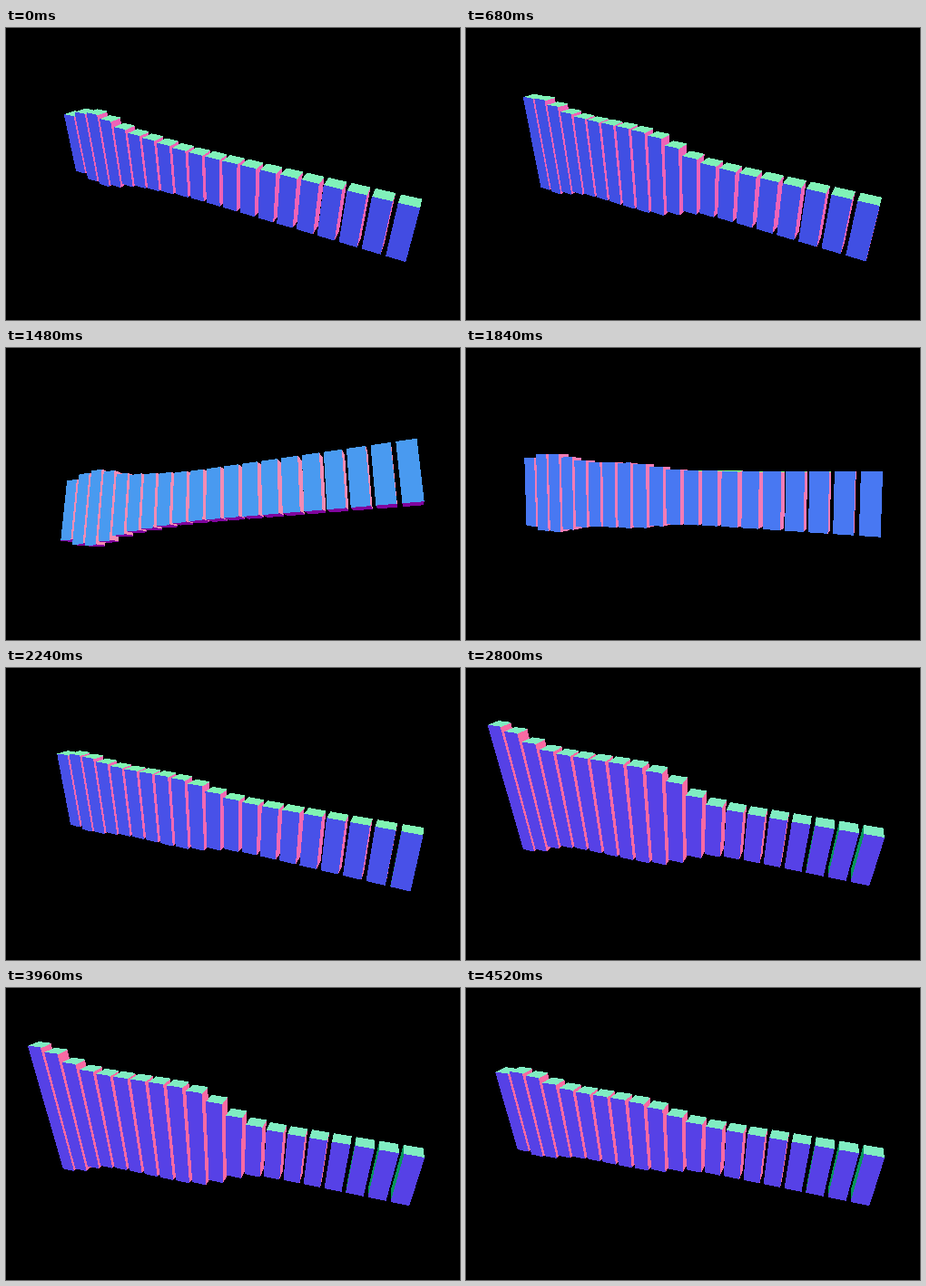
A matplotlib script that plays this animation: 500 by 322 pixels, repeating every 4.56 s.

```python
import numpy as np
import matplotlib.pyplot as plt
from matplotlib.animation import FuncAnimation
from matplotlib.collections import PolyCollection

W, H, DPI = 500, 322, 100
STEP, LOOP = 40, 4560
BARS, SIDE, BASE = 20, 0.76, 2.6
FOCAL, RADIUS, CX, CY = 420, 19.85, 250, 163.5
LEFT, FRONT = -10.98, 1.05

# Dragged orbit: time, azimuth, elevation (degrees)
CAMERA = np.array([
    (600, 29, 27.5), (1160, 43.3, 0.3), (1340, 33, -17),
    (1480, 25.2, -13.3), (2240, 26, 24), (2600, 19, 31.5),
])

# Music: time, bass level, mid level
MUSIC = np.array([
    (0, 1.5, 0.5), (780, 1.4, 2.2), (1160, 1.2, 0.9), (1480, 1.4, 0.5),
    (2240, 0.8, 1.4), (2800, 2.2, 3.2), (2980, 2.8, 3.4), (3400, 1.5, 3.2),
    (4120, 2.2, 3.2), (4520, 1.2, 1.5),
])


def ease_keys(keys, t):
    """Smoothstep between rows of (time, values...), held at both ends."""
    position = np.interp(t, keys[:, 0], np.arange(len(keys)))
    k = min(int(position), len(keys) - 2)
    u = position - k
    u = u * u * (3 - 2 * u)
    return keys[k, 1:] * (1 - u) + keys[k + 1, 1:] * u


def bar_heights(t):
    """A bass hump on a plateau of mids; louder mids reach further."""
    bass, mid = ease_keys(MUSIC, t)
    i = np.arange(BARS)
    peak = max(0, 2.2 - 0.75 * mid)
    edge = 11 - 2 / mid
    hump = bass * np.exp(-((i - peak) / 2) ** 2)
    plateau = mid / (1 + np.exp(1.5 * (i - edge)))
    return BASE + hump + plateau


def cube_faces():
    """Each face of a unit cube as (normal, four corners)."""
    faces = []
    for axis in range(3):
        for sign in (-1, 1):
            normal = sign * np.eye(3)[axis]
            corners = np.empty((4, 3))
            corners[:, axis] = sign
            corners[:, (axis + 1) % 3] = [-1, 1, 1, -1]
            corners[:, (axis + 2) % 3] = [-1, -1, 1, 1]
            faces.append((normal, corners / 2))
    return faces


FACES = cube_faces()


def view_matrix(azimuth, elevation):
    s, c = np.sin(azimuth), np.cos(azimuth)
    se, ce = np.sin(elevation), np.cos(elevation)
    return np.array([[c, 0, -s],
                     [-se * s, ce, -se * c],
                     [ce * s, se, ce * c]])


def project(points, view):
    x, y, z = view @ points.T
    scale = FOCAL / (RADIUS - z)
    return np.column_stack([CX + x * scale, CY - y * scale])


def scene(t):
    view = view_matrix(*np.radians(ease_keys(CAMERA, t)))
    heights = bar_heights(t)
    eye = RADIUS * view[2]
    xs = LEFT + SIDE / 2 + np.arange(BARS)
    polygons, colors = [], []
    for i in np.argsort(-np.abs(xs - eye[0])):
        center = np.array([xs[i], 0, FRONT - SIDE / 2])
        size = np.array([SIDE, heights[i], SIDE])
        for normal, corners in FACES:
            points = center + corners * size
            if normal @ (eye - points[0]) > 0:
                polygons.append(project(points, view))
                # The normal seen by the camera gives the colour
                colors.append(np.clip(view @ normal * 0.5 + 0.5, 0, 1))
    return polygons, colors


fig = plt.figure(figsize=(W / DPI, H / DPI), dpi=DPI, facecolor="black")
ax = fig.add_axes([0, 0, 1, 1])
ax.set(xlim=(0, W), ylim=(H, 0))
ax.axis("off")
bars = PolyCollection([], edgecolors="none", linewidths=0, antialiaseds=False)
ax.add_collection(bars, autolim=False)


def draw(frame):
    polygons, colors = scene(frame * STEP)
    bars.set_verts(polygons)
    bars.set_facecolor(colors)
    return [bars]


anim = FuncAnimation(fig, draw, frames=LOOP // STEP, interval=STEP,
                     repeat=True, repeat_delay=0)
plt.show()
```
